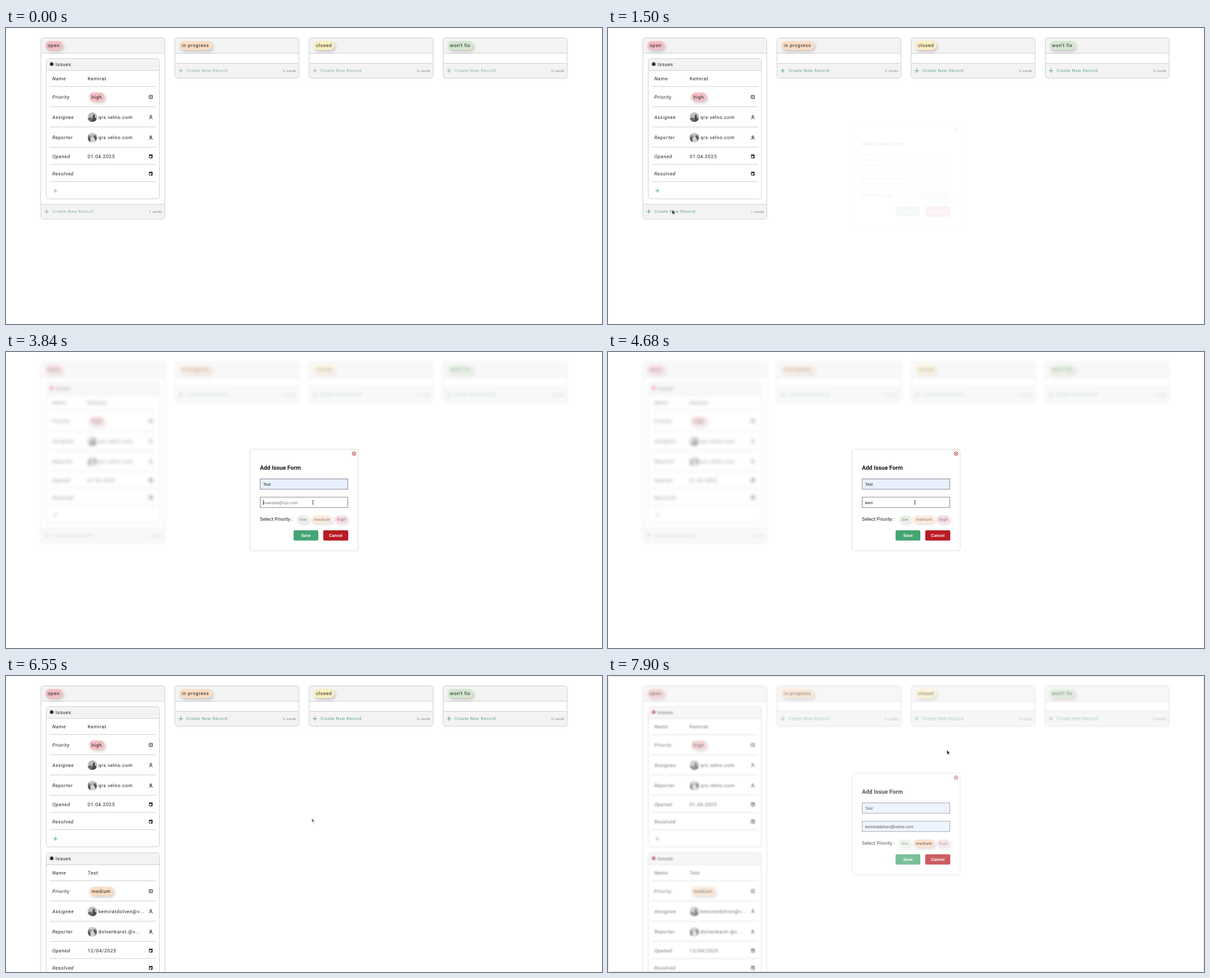
Recreate the animation shown at these times as an HTML page. Size 1000 px wide and 498 px high, loop 8000 ms.

```html
<!DOCTYPE html>
<html lang="en">
<head>
<meta charset="utf-8">
<title>Issue board</title>
<style>
  html, body { margin: 0; width: 100%; height: 100%; overflow: hidden; background: #fff; }
  svg { position: absolute; left: 0; top: 0; width: 1000px; height: 498px; }
  text { font-family: Roboto, sans-serif; text-rendering: geometricPrecision; white-space: pre; }
  .t { font-size: 8px; letter-spacing: .55px; fill: #1d1d1d; }
  .label { font-style: italic; }
  .create { font-size: 7.1px; letter-spacing: .5px; fill: var(--green); }
  .count { font-size: 5.5px; letter-spacing: .6px; fill: #777; }
  .line { stroke: #d2d2d2; fill: none; }
  .bar { fill: #f4f3f3; }
  .plus { stroke: var(--green); stroke-width: 1.1; }
  .icon { fill: none; stroke: #222; stroke-width: 1; }
  .shade { filter: drop-shadow(2px 3px 2.5px rgba(70, 50, 60, .24)); }
  .input { font: 6.85px "Liberation Sans", Arial, sans-serif; fill: #151515; }
  .hint { fill: #757575; }
  .button { font: bold 6.9px "Liberation Sans", Arial, sans-serif; fill: #fff; text-anchor: middle; }
  .choice { font-size: 6.6px; letter-spacing: .55px; text-anchor: middle; }
</style>
</head>
<body>
<svg id="board" viewBox="0 0 1000 498"></svg>
<svg id="front" viewBox="0 0 1000 498"></svg>
<script>
const LOOP = 8000;
const $ = id => document.getElementById(id);
const clamp = v => Math.max(0, Math.min(1, v));
const ramp = (t, a, b) => clamp((t - a) / (b - a));
const mix = (a, b, k) => `rgb(${a.map((v, i) => Math.round(v + (b[i] - v) * k))})`;

// Drawing helpers
const text = (x, y, s, cls = 't', more = '') => `<text x="${x}" y="${y}" class="${cls}" ${more}>${s}</text>`;
const rect = (x, y, w, h, more = '') => `<rect x="${x}" y="${y}" width="${w}" height="${h}" ${more}/>`;
const path = (d, more = '') => `<path d="${d}" ${more}/>`;
const at = (x, y, s, more = '') => `<g transform="translate(${x} ${y})" ${more}>${s}</g>`;
const hline = (x1, x2, y) => path(`M${x1} ${y}H${x2}`, 'class="line"');
const plus = (x, y) => path(`M${x - 3.5} ${y}h7M${x} ${y - 3.5}v7`, 'class="plus"');
const pill = (x, y, w, color, label) =>
  rect(x, y, w, 15, `rx="7.5" fill="${color}" class="shade"`) + text(x + 4, y + 10.3, label);

const icons = {
  select: rect(-2.7, -2.7, 5.4, 5.4, 'rx=".6" class="icon"') + path('M-1.5-.7h3L0 1.1Z', 'fill="#222"'),
  person: '<circle cy="-1.5" r="1.5" class="icon"/>' + path('M-2.7 3.2C-2.7.2 2.7.2 2.7 3.2', 'class="icon"'),
  date: rect(-2.6, -2.3, 5.2, 5.2, 'rx=".6" class="icon"') +
    path('M-3-2.8h6v2h-6ZM-1.9-3.6h1v1h-1ZM.9-3.6h1v1h-1ZM.2.5h1.8v1.8H.2Z', 'fill="#222"')
};
const bug = '<g style="fill:var(--bug);stroke:var(--bug)">' +
  '<ellipse rx="2.1" ry="2.8" stroke="none"/>' +
  path('M-3.3-2.4L3.3 2.2M-3.6 0H3.6M-3.3 2.2L3.3-2.4M-1.3-3.2h2.6', 'stroke-width=".9"') + '</g>';
const avatar = light => '<g clip-path="url(#round)">' +
  rect(-8, -8, 16, 16, `fill="${light ? '#bdbdbd' : '#8b8987'}"`) +
  (light
    ? path('M-8 2L-2 0 1 8H-8Z', 'fill="#666"') + path('M1-4Q5-5 4 0L8 4V8H-1Z', 'fill="#4d4d4d"')
    : path('M-8-8H8L3-3H-4Z', 'fill="#c9c7c4"') + path('M-3 8Q-5 0-1-2T4 2L5 8Z', 'fill="#d3d0cc"') +
      path('M-7-1l3 1 1 6-4 1ZM1-4l4 1 2 5-3 1Z', 'fill="#555"')) + '</g>';

function card(dy, d) {
  const rows = [
    ['Name', 85, 98.5], ['Priority', 116, 132.5, 'select'], ['Assignee', 150, 166.5, 'person'],
    ['Reporter', 184.5, 200.5, 'person'], ['Opened', 216, 229.5, 'date'], ['Resolved', 245, 258.5, 'date']
  ];
  const values = [d.name, '', d.assignee, d.reporter, d.opened, ''];
  const body = rows.map(([label, y, rule, icon], i) => {
    const who = icon === 'person';
    return text(77.7, y + 2.9, label, 't label') + hline(73, 252, rule) +
      (who ? at(145, y, avatar(i === 2)) : '') +
      text(who ? 155 : 137, y + 2.9, values[i]) +
      (icon ? at(243, y, icons[icon]) : '');
  }).join('');
  return at(0, dy,
    rect(67.5, 51.5, 190, 236, 'rx="4" fill="#fff" class="line" style="fill:#fff"') +
    path('M68 71V55.5q0-3.5 3.5-3.5H253.5q3.5 0 3.5 3.5V71Z', 'class="bar"') +
    hline(68, 257, 71.5) + at(76.7, 61, bug) + text(83, 63.9, 'Issues') + body +
    pill(139.5, 108.5, d.width, d.color, d.level) + plus(83, 273.8));
}

const footer = (x, y, count) =>
  path(`M${x + 1} ${y}H${x + 208}V${y + 21}q0 4-4 4H${x + 5}q-4 0-4-4Z`, 'class="bar"') +
  hline(x + 1, x + 208, y) + plus(x + 10.3, y + 12.3) +
  text(x + 19.7, y + 14.9, 'Create New Record', 'create') +
  text(x + 204.3, y + 14.2, `${count} cards`, 'count', 'text-anchor="end"');

function column(x, height, label, width, color, id = '') {
  return path(`M${x + 1} 42V21q0-4 4-4H${x + 204}q4 0 4 4V42Z`, 'class="bar"') +
    rect(x + .5, 16.5, 208, height, `rx="4" class="line" ${id}`) +
    hline(x + 1, x + 208, 42.5) + pill(x + 8, 22, width, color, label);
}

$('board').innerHTML =
  '<defs><clipPath id="round"><circle r="8"/></clipPath></defs>' +
  '<g id="foot">' + footer(58, 296.5, 1) + '</g>' +
  column(58, 305, 'open', 29, '#f2bec4', 'id="outline"') +
  [['in progress', 55, '#fadec4'], ['closed', 35, '#fdefc0'], ["won't fix", 43, '#d2e7cd']]
    .map((c, i) => footer(283 + i * 225, 59.5, 0) + column(283 + i * 225, 68, ...c)).join('') +
  card(0, { name: 'Kemirat', level: 'high', width: 26, color: '#f2bec4',
    assignee: 'qrs.velno.com', reporter: 'qrs.velno.com', opened: '01.04.2025' }) +
  '<g id="added">' + card(246, { name: 'Test', level: 'medium', width: 41, color: '#fadec4',
    assignee: 'kemiratdolven@v...', reporter: 'dolvenkarst.@v...', opened: '12/04/2025' }) + '</g>';

const field = (id, y) =>
  rect(426.5, y, 147, 17.5, `id="${id}Box" stroke="#7d8188" stroke-width=".9"`) +
  text(431.6, y + 11.3, '', 'input', `id="${id}"`) +
  path(`M0 ${y + 4.5}v8.5`, `id="${id}Caret" stroke="#111" stroke-width=".8"`);
const choice = (id, x, w, color) => `<g id="${id}">` +
  rect(x, 275, w, 13, `rx="6.5" fill="${color}" class="shade"`) +
  text(x + w / 2 + .3, 283.8, id, 'choice') + '</g>';
const button = (x, w, color, label) =>
  rect(x, 300, w, 17.3, `rx="2" fill="${color}"`) + text(x + w / 2, 311, label, 'button');

$('front').innerHTML =
  rect(.5, .5, 999, 497, 'id="edge" rx="5" fill="none" stroke="#dcdcdc"') +
  '<g id="form">' +
  rect(409.5, 163.5, 181.5, 171, 'rx="4" fill="#fff" stroke="#dedede"') +
  at(584, 171, '<circle r="3.1"/>' + path('M-1.3-1.3L1.3 1.3M1.3-1.3L-1.3 1.3'), 'fill="none" stroke="#b5232c" stroke-width=".9"') +
  text(426, 198.3, 'Add Issue Form', '', 'font-size="9.75" font-weight="700" fill="#151515"') +
  field('title', 213.5) + field('mail', 244.2) +
  text(426, 284, 'Select Priority :', '', 'font-size="8.25" fill="#222"') +
  choice('low', 488, 20.5, '#d9e8d5') + choice('medium', 512.5, 35.5, '#fad9bb') + choice('high', 551.5, 22.5, '#f3c3ca') +
  button(482.5, 41.5, '#45a675', 'Save') + button(532.3, 42, '#b91c24', 'Cancel') + '</g>' +
  '<g id="pointer">' +
  path('M0 0V7.4L1.7 5.9 2.9 8.4 4.1 7.9 3 5.4H5.3Z', 'id="arrow" fill="#222" stroke="#fff" stroke-width=".5"') +
  path('M-1.2-3.3Q0-3.3 0-2.5 0-3.3 1.2-3.3M0-2.5V2.5M-1.2 3.3Q0 3.3 0 2.5 0 3.3 1.2 3.3', 'id="beam" fill="none" stroke="#222" stroke-width=".8"') +
  path('M-1.6-3.3q.7-.6 1.2 0V-1Q2.6-1.2 2.8.2V2L1.9 3.7H-1.2L-3 .8q.2-.9 1.4 0Z', 'id="hand" fill="#fff" stroke="#222" stroke-width=".7"') +
  '</g>';

// Pointer stops: time, x, y
const stops = [
  [280, 300, 180], [1040, 107.7, 306], [2000, 107.7, 306], [2780, 500, 223], [3410, 500, 223],
  [3780, 515, 253], [5140, 515, 253], [5430, 531, 282], [5540, 531, 282], [5770, 517, 307],
  [5990, 517, 307], [6550, 513, 239], [6730, 513, 239], [7180, 553, 83], [7420, 553, 83],
  [7520, 550, 73], [7640, 550, 73], [7880, 568.7, 124.5], [8000, 568.7, 124.5]
];
function pointerAt(t) {
  const i = Math.max(1, stops.findIndex(s => s[0] > t));
  const [a, x, y] = stops[i - 1], [b, X, Y] = stops[i];
  const u = ramp(t, a, b), k = u * u * (3 - 2 * u);
  return [x + (X - x) * k, y + (Y - y) * k];
}

// Typed values: the last step at or before t wins
const typed = {
  title: [[0, ''], [2950, 'T'], [3090, 'Te'], [3250, 'Tes'], [3410, 'Test']],
  mail: [[0, ''], [4260, 'k'], [4400, 'ke'], [4540, 'kem'], [4870, 'kemiratdolven@velno.com']]
};
const hints = { title: 'Name', mail: 'example@xyz.com' };
const focus = { title: [2860, 3700], mail: [3800, 5300] };

function drawField(id, t) {
  const steps = typed[id], step = steps.filter(s => s[0] <= t).pop();
  const el = $(id), value = step[1], [from, to] = focus[id];
  el.textContent = value || hints[id];
  el.classList.toggle('hint', !value);
  $(id + 'Box').setAttribute('fill', step === steps[steps.length - 1] ? '#e8f0fe' : '#fff');
  const width = value ? el.getComputedTextLength() : 0;
  const caret = $(id + 'Caret');
  caret.setAttribute('transform', `translate(${431.8 + width} 0)`);
  caret.style.display = t >= from && t < to && (t - from) % 1000 < 500 ? '' : 'none';
}

function draw(t) {
  const p = t < 6600 ? ramp(t, 1480, 1900) - ramp(t, 5970, 6450) : ramp(t, 7602, 8022);
  const board = $('board');
  board.style.setProperty('--green', mix([142, 178, 155], [88, 165, 122], ramp(t, 280, 1040)));
  board.style.setProperty('--bug', mix([25, 20, 20], [205, 35, 50], p));
  board.style.filter = p > 0 ? `blur(${2.4 * p ** 3}px)` : 'none';
  board.style.opacity = 1 - .5 * p;
  $('edge').style.opacity = 4 * p * (1 - p);
  $('form').style.opacity = p;

  const saved = t >= 6050;
  $('added').style.display = saved ? '' : 'none';
  $('foot').style.display = saved ? 'none' : '';
  $('outline').setAttribute('height', saved ? 551 : 305);

  drawField('title', t);
  drawField('mail', t);
  const picked = t >= 5480;
  for (const id of ['low', 'medium', 'high'])
    $(id).style.opacity = picked && id === 'medium' ? 1 : .55;

  const [x, y] = pointerAt(t);
  const inField = p > .5 && x > 426 && x < 574 && (y > 213 && y < 231 || y > 244 && y < 262);
  const onButton = p > .5 && t > 5300 && y > 274 && y < 318;
  const shape = inField ? 'beam' : onButton ? 'hand' : 'arrow';
  for (const id of ['arrow', 'beam', 'hand']) $(id).style.display = id === shape ? '' : 'none';
  $('pointer').setAttribute('transform', `translate(${x} ${y})`);
  $('pointer').style.opacity = t < 280 ? 0 : t >= 6450 && t < 6730 ? .6 : 1;
}

const start = performance.now();
function tick() {
  draw((performance.now() - start) % LOOP);
  requestAnimationFrame(tick);
}
tick();
</script>
</body>
</html>
```
